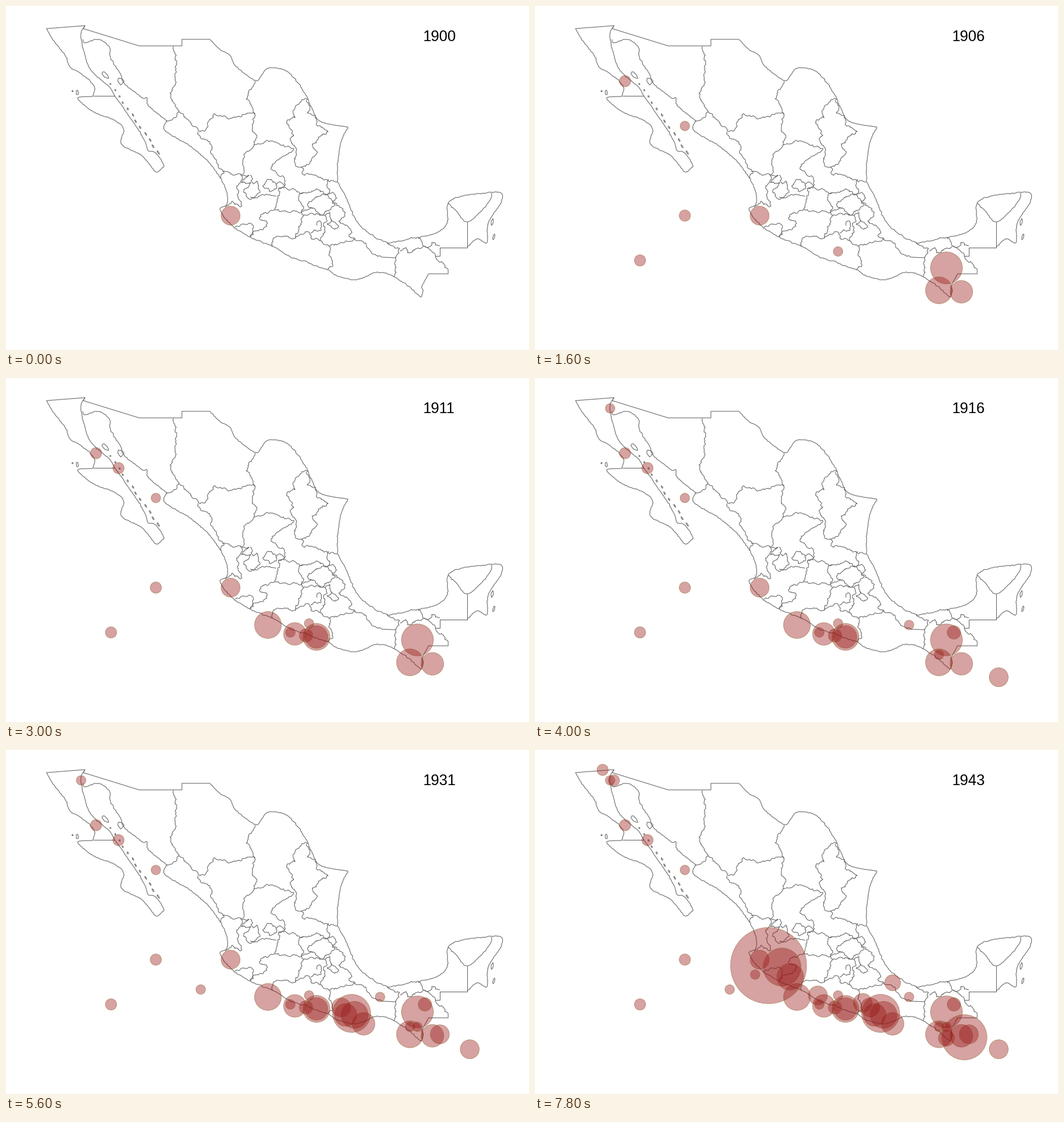
Animation of 880x578 px, one loop 8 s. Source, as a matplotlib script:

```python
import numpy as np
import matplotlib.pyplot as plt
from matplotlib.animation import FuncAnimation
from matplotlib.collections import LineCollection
from matplotlib.patches import Circle

W, H, DPI = 880, 578, 64
PX = 72 / DPI
INK = "#666666"
FILL = (0.60, 0.094, 0.094, 0.40)
RIM = (0.52, 0.36, 0.12, 0.55)

rng = np.random.default_rng(19)
paths = []


def rough(p, q, amp):
    """Points from p up to q, bent by midpoint displacement."""
    d = q - p
    size = np.hypot(*d)
    if amp == 0 or size < 2:
        return [p]
    bend = np.clip(rng.normal(0, amp * size), -2, 2) / size
    mid = (p + q) / 2 + bend * np.array([-d[1], d[0]])
    return rough(p, mid, amp) + rough(mid, q, amp)


def spline(pts, steps=6):
    """Catmull-Rom curve through the points."""
    ends = np.vstack([2 * pts[0] - pts[1], pts, 2 * pts[-1] - pts[-2]])
    t = np.linspace(0, 1, steps, endpoint=False)[:, None]
    out = []
    for a, b, c, d in zip(ends, ends[1:], ends[2:], ends[3:]):
        out += list(b + t * ((c - a) / 2 + t * (a - 2.5 * b + 2 * c - d / 2
                    + t * (1.5 * (b - c) + (d - a) / 2))))
    return np.array(out + [pts[-1]])


def line(amp, *xy, smooth=False):
    pts = np.array(xy, float).reshape(-1, 2)
    if smooth:
        pts = spline(pts)
    out = []
    for p, q in zip(pts, pts[1:]):
        out += rough(p, q, amp)
    paths.append(np.array(out + [pts[-1]]))


def straight(*xy):
    line(0, *xy)


def border(*xy):
    line(.17, *xy)


def coast(*xy):
    line(.1, *xy, smooth=True)


def island(x, y, rx, ry, tilt=0.0):
    a = np.linspace(0, 2 * np.pi, 9)
    r = rng.uniform(.7, 1.2, 9)
    r[-1] = r[0]
    u, v = rx * r * np.cos(a), ry * r * np.sin(a)
    c, s = np.cos(tilt), np.sin(tilt)
    paths.append(np.column_stack([x + c * u - s * v, y + s * u + c * v]))


# Northern frontier
straight(68, 38, 133, 33, 130, 38, 224, 67, 296, 67, 296, 56, 343, 56)
coast(343, 56, 360, 73, 377, 83, 387, 102, 419, 125, 429, 118, 442, 104,
      475, 111, 503, 147, 511, 164, 525, 191, 546, 199, 575, 203)

# Western peninsula, ocean side then gulf side
coast(68, 38, 80, 58, 99, 82, 108, 103, 124, 112, 148, 134, 146, 152)
coast(146, 152, 121, 154, 131, 166, 150, 179, 186, 194, 198, 208, 194, 232,
      225, 249, 240, 264, 253, 279, 266, 269)
coast(266, 269, 260, 257, 249, 245, 239, 243, 234, 228, 218, 201, 202, 178,
      195, 167, 183, 151, 175, 137, 162, 126, 141, 105, 131, 76, 126, 47,
      133, 33)
straight(147, 151, 183, 151)

# Mainland side of the gulf
coast(129, 56, 133, 62, 155, 56, 174, 69, 176, 87, 193, 115, 199, 130,
      229, 154, 237, 154, 239, 167, 258, 183, 271, 193)

island(168, 117, 8, 3, .8)
island(193, 126, 5, 6)
island(120, 146, 2, 4)
island(112, 143, 1, 1)
for t in np.linspace(0, 1, 12):
    wobble = rng.uniform(-2, 2)
    island(176 + 80 * t + wobble, 131 + 115 * t, 1, 1 + 2.5 * t, -.5)
island(818, 363, 1.8, 5, .2)
island(821, 387, 1.5, 5, .3)

# Eastern coast
coast(575, 203, 562, 235, 558, 291, 570, 317, 583, 348, 602, 375, 641, 397,
      685, 390, 722, 382, 742, 365, 744, 331, 770, 319, 817, 313, 834, 315,
      833, 330, 817, 354, 810, 370, 809, 398, 793, 391, 776, 405)
coast(744, 331, 759, 346, 776, 363, 802, 342, 816, 323, 817, 314)
straight(776, 363, 776, 406, 730, 406, 730, 420, 722, 420)
border(722, 420, 727, 428, 744, 443)
straight(744, 443, 744, 450, 711, 450, 699, 472, 702, 478, 699, 489)

# Southern and western coast
coast(699, 489, 653, 455, 622, 448, 590, 460, 556, 453, 540, 443, 478, 421,
      450, 404, 411, 388, 378, 367, 360, 342, 372, 333, 371, 312, 357, 283,
      331, 252, 303, 231, 267, 209, 270, 193)

# Northern states
border(282, 68, 287, 99, 285, 133, 276, 146, 291, 177, 287, 186, 270, 194)
border(291, 177, 304, 190, 327, 211, 335, 210, 350, 181, 373, 189, 404, 181,
       419, 182, 415, 172, 404, 156, 408, 143, 419, 126)
border(419, 182, 417, 212, 421, 222, 417, 234, 403, 247, 398, 283)
border(417, 234, 438, 226, 484, 239, 446, 272, 468, 288, 470, 300, 459, 307)
border(509, 157, 495, 161, 484, 175, 486, 188, 474, 191, 484, 218, 479, 225,
       488, 245, 489, 270, 497, 271)
border(505, 158, 511, 175, 507, 180, 521, 184, 522, 199, 542, 211, 515, 232,
       524, 246, 510, 266, 497, 271, 500, 283, 557, 296)
border(323, 211, 345, 233, 344, 244, 367, 280, 360, 290)

# West centre
border(364, 277, 397, 284, 388, 306, 397, 336, 380, 328, 369, 338)
border(394, 284, 409, 285, 396, 296, 412, 297, 400, 311, 411, 325,
       427, 310, 422, 294, 416, 299, 411, 284)
border(432, 302, 446, 291, 455, 299, 455, 307, 445, 312, 432, 302)
border(411, 321, 436, 318, 454, 320)
border(455, 299, 463, 297, 468, 304)
border(452, 342, 430, 350, 427, 358, 438, 361, 439, 370, 418, 378, 411, 388)
border(385, 372, 410, 365, 416, 369, 411, 388)
border(459, 306, 452, 342, 497, 347, 501, 337, 493, 320, 500, 314, 459, 306)

# East centre
border(500, 314, 519, 310, 541, 317, 545, 308, 540, 300, 543, 291)
border(497, 347, 516, 340, 507, 333, 523, 320, 541, 317, 553, 335, 545, 343,
       528, 352, 516, 339)
border(541, 317, 550, 313, 556, 322, 549, 328, 566, 340, 571, 347, 560, 362,
       573, 368, 580, 376, 577, 387, 587, 393)
border(497, 347, 501, 352, 487, 390, 510, 380, 513, 390, 528, 394, 545, 404)
border(501, 352, 537, 352, 540, 362, 534, 366, 537, 380, 528, 394)
border(523, 369, 527, 361, 531, 370, 530, 377, 519, 376, 513, 382)
border(540, 366, 548, 360, 560, 370, 551, 374, 540, 366)
border(537, 352, 545, 347, 548, 360)

# South
border(449, 403, 449, 393, 458, 387, 487, 390)
border(545, 404, 543, 418, 550, 436, 541, 443)
border(545, 404, 587, 391, 606, 401, 612, 410, 632, 422)
straight(632, 422, 656, 423)
border(641, 397, 662, 407, 656, 423, 653, 455)
border(663, 411, 672, 406, 676, 415, 705, 404, 722, 420)
border(694, 388, 702, 403, 712, 405, 717, 397, 730, 403)

# One event per step: longitude, latitude, magnitude
events = [
    (-105, 20, 7.4), (-110, 20, 7.1), (-91.5, 14.9, 7.5), (-92.5, 16.5, 7.7),
    (-93, 15, 7.6), (-114, 29, 7.1), (-113, 17, 7.1), (-110, 26, 7.0),
    (-99.75, 17.6, 7.0), (-99.25, 16.7, 7.6), (-99.25, 16.7, 7.5),
    (-101, 17, 7.0), (-99.95, 16.8, 7.2), (-112.5, 28, 7.1),
    (-102.5, 17.5, 7.6), (-100.7, 16.9, 7.5), (-92, 17, 7.2),
    (-93, 15.5, 7.0), (-89, 14, 7.4), (-115, 32, 7.0), (-95, 17.5, 7.0),
    (-91, 15, 7.4), (-92.5, 15.5, 7.0), (-107, 18, 7.0), (-96.1, 15.7, 7.5),
    (-96.7, 16.3, 7.6), (-97.6, 16.8, 7.4), (-97.3, 16.3, 7.5),
    (-96.9, 16.4, 7.8), (-104.4, 19.6, 8.2), (-103.5, 19.5, 7.8),
    (-105.3, 19, 7.0), (-114.75, 32, 7.1), (-92.5, 14.75, 7.3),
    (-96.1, 18.45, 7.3), (-98.1, 17.1, 7.4), (-115.5, 32.7, 7.1),
    (-102.95, 18.85, 7.6), (-91.3, 14.8, 7.9), (-101.1, 17.6, 7.4),
]


def project(lon, lat):
    return 377.9 + 25.15 * (lon + 105), 352.2 - 25.1 * (lat - 20)


def year(step):
    return int(np.interp(step, [0, 8, 15, 20, 24, 27, 28, 34, 39],
                         [1900, 1906, 1911, 1916, 1928, 1928, 1931, 1937, 1943]))


fig = plt.figure(figsize=(W / DPI, H / DPI), dpi=DPI, facecolor="white")
ax = fig.add_axes([0, 0, 1, 1])
ax.set(xlim=(0, W), ylim=(H, 0))
ax.axis("off")
ax.add_collection(LineCollection(paths, colors=INK, linewidths=1.05 * PX))

dots = []
for lon, lat, mag in events:
    radius = 16 * 2 ** ((mag - 7.4) / 0.4)
    dot = Circle(project(lon, lat), radius, fc=FILL, ec=RIM, lw=0.8 * PX, zorder=3)
    dots.append(ax.add_patch(dot))

label = ax.text(701.3, 59.3, "", fontsize=25 * PX, family="Liberation Sans",
                color="black", ha="left", va="baseline", zorder=4)


def draw(step):
    for i, dot in enumerate(dots):
        dot.set_visible(i <= step)
    label.set_text(str(year(step)))
    return [*dots, label]


anim = FuncAnimation(fig, draw, frames=len(events), interval=200,
                     repeat=True, repeat_delay=0, blit=False)
plt.show()
```
